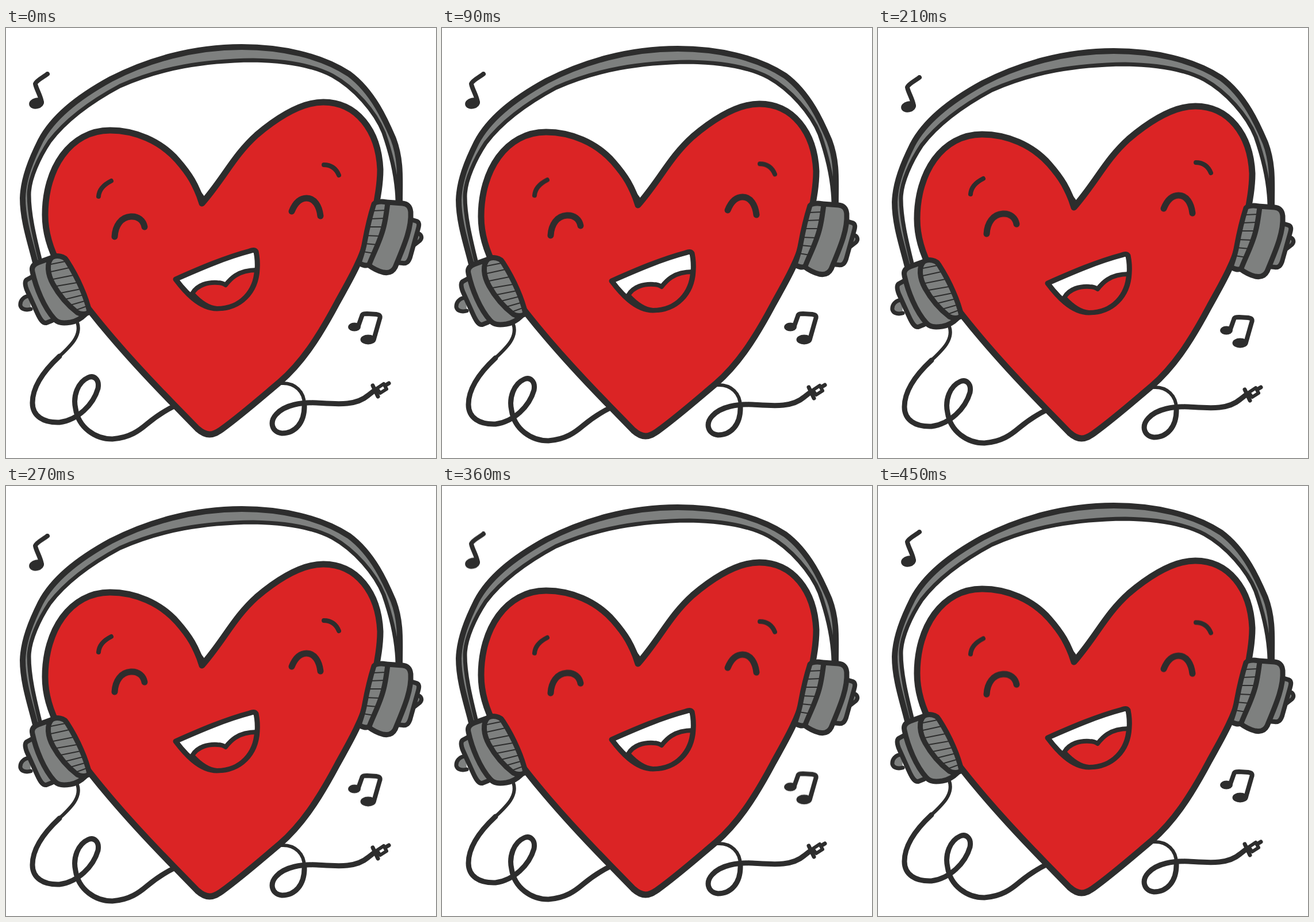
An HTML page for the animation above (480 ms loop, 748 by 748 pixels).

```html
<!DOCTYPE html>
<html lang="en">
<head>
<meta charset="utf-8">
<title>Heart with headphones</title>
<style>
  html, body { margin: 0; width: 100%; height: 100%; overflow: hidden; background: #fff; }
  svg { display: block; width: 100%; height: 100%; }
  path { fill: none; stroke: #2d2d2d; stroke-width: 9; stroke-linecap: round; stroke-linejoin: round; }
  ellipse, .ink { fill: #2d2d2d; }
  .red { fill: #db2425; }
  .gray { fill: #7e807f; }
  .white { fill: #fff; }
  .hair { stroke-width: 2; }
  .w6 { stroke-width: 6; }
  .w7 { stroke-width: 7; }
  .w8 { stroke-width: 8; }
  .w10 { stroke-width: 10; }
  .w11 { stroke-width: 11; }

  .bob { animation: bob 480ms infinite; }
  .eyes { --rise: -5.6px; animation: lift 480ms infinite; }
  .brows { --rise: -4.6px; animation: lift 480ms infinite; }
  .notes { animation: drop 480ms infinite; }

  @keyframes bob {
    0%, 100% { transform: translateY(0); animation-timing-function: steps(8); }
    50% { transform: translateY(8px); animation-timing-function: steps(8); }
  }
  @keyframes lift {
    0%, 100% { transform: translateY(0); animation-timing-function: steps(8); }
    50% { transform: translateY(var(--rise)); animation-timing-function: steps(8); }
  }
  @keyframes drop {
    0%, 93.75%, 100% { transform: translateY(0); }
    25% { transform: translateY(0); animation-timing-function: steps(4); }
    50% { transform: translateY(8px); animation-timing-function: steps(7); }
  }
</style>
</head>
<body>
<svg viewBox="0 0 748 748">
  <g class="bob">
    <!-- headband -->
    <path class="gray w10" d="M51 408C43 375 29 335 29 296C30 262 44 228 60 196C81 156 122 122 182 89C246 56 325 33 410 33C480 33 548 48 597 80C640 112 662 165 674 193C688 230 685 265 685 300"/>
    <path class="white w7" d="M59 402C50 365 40 325 40 290C40 262 58 224 76 197C102 163 142 131 198 101C270 69 345 57 430 56C490 57 538 67 568 83C606 104 642 145 657 182C671 222 680 262 681 300"/>

    <!-- cable -->
    <path class="w6" d="M124 512C132 535 112 553 93 571"/>
    <path d="M93 571C65 597 46 625 46 652C46 675 65 687 93 686C125 682 152 655 160 627C163 610 152 604 143 608C125 616 116 640 121 662C126 695 155 715 185 715C215 713 232 700 245 689C258 678 272 668 292 658"/>
    <path class="w6" d="M480 618C503 617 519 633 519 655"/>
    <path d="M519 655C520 688 502 705 480 705C462 703 458 685 470 672C485 655 515 651 540 652C575 654 608 658 630 639L639 632"/>
    <path class="w6 white" d="M645 627L657 619L662 628L651 635Z"/>
    <path class="w7" d="M638 622L647 641M661 621L666 618"/>

    <!-- heart -->
    <path class="red w11" d="M341 305C331 273 319 254 298 230C268 196 224 178 181 178C111 178 68 245 68 325C68 390 108 443 147 493C188 545 240 602 292 655L333 697C341 704 347 707 354 707C362 707 368 703 374 699C410 673 445 642 476 616C514 583 543 540 576 478C594 445 617 408 632 358C645 310 651 275 651 246C648 178 610 129 552 129C512 129 468 159 436 186C396 222 380 260 341 305Z"/>
    <path class="ink w6" d="M323 268L343 295L341 304Z"/>

    <!-- mouth -->
    <path class="white" d="M295 437C310 457 336 488 367 488C408 488 435 459 437 420C438 408 437 399 435 389C433 386 429 386 424 388C382 399 338 418 295 437Z"/>
    <path class="red w8" d="M324 462C333 446 352 442 368 443C375 443 379 445 382 447C389 438 402 421 436 421C434 457 409 488 367 488C350 487 335 474 324 462Z"/>

    <!-- left cup -->
    <path class="gray w7" d="M42 466C30 466 24 475 25 483C27 490 36 491 43 489"/>
    <path class="gray w8" d="M47 432L36 438C32 441 33 447 36 455L54 495C60 508 64 514 70 513L80 509"/>
    <path class="gray" d="M78 400L56 408C48 411 44 416 46 424C52 452 66 486 84 506C90 513 98 514 112 512C124 510 132 504 138 498"/>
    <path class="gray" d="M80 399C70 408 72 428 82 446C92 464 106 481 124 495C131 499 142 498 145 493C140 470 126 436 106 405C102 397 88 394 80 399Z"/>
    <path class="hair" d="M78 411L103 406M78 424L110 417M82 437L117 430M88 449L123 443M95 461L130 454M103 472L135 464M112 482L140 474M121 491L143 483"/>

    <!-- right cup -->
    <path class="gray w7" d="M715 357C723 358 725 365 720 370L711 377"/>
    <path class="gray w8" d="M704 333L714 336C719 338 719 342 717 349L703 399C700 407 697 410 690 409L679 408"/>
    <path class="gray" d="M662 303L690 305C699 306 703 311 704 320C706 351 689 386 677 416C673 424 666 427 656 425C648 423 638 418 630 412"/>
    <path class="gray" d="M640 306C633 328 628 350 624 372C622 385 618 396 614 408C618 412 627 415 632 411C639 392 651 371 657 346C661 330 662 318 664 305C660 301 644 301 640 306Z"/>
    <path class="hair" d="M638 318L661 317M633 332L659 331M629 346L656 346M626 361L651 362M624 375L646 377M621 389L640 392"/>
  </g>

  <!-- face -->
  <g class="brows">
    <path class="w8" d="M161 293C162 280 171 272 183 266M553 238C566 238 574 244 579 256"/>
  </g>
  <g class="eyes">
    <path class="w11" d="M189 363C190 344 200 329 217 328C230 327 239 335 241 346M497 319C503 304 512 296 523 296C537 296 545 310 547 327"/>
  </g>

  <g class="notes">
    <ellipse cx="53" cy="131" rx="13" ry="9.5" transform="rotate(-12 53 131)"/>
    <path class="w8" d="M62 129C60 117 52 105 51 97C53 91 66 85 72 80"/>
    <ellipse cx="606" cy="520" rx="11" ry="7.5"/>
    <ellipse cx="630" cy="542" rx="13.5" ry="8.5"/>
    <path class="w8" d="M613 518L619 501C620 497 623 497 628 497L644 498C650 499 652 501 650 506L640 541"/>
  </g>
</svg>
</body>
</html>
```
